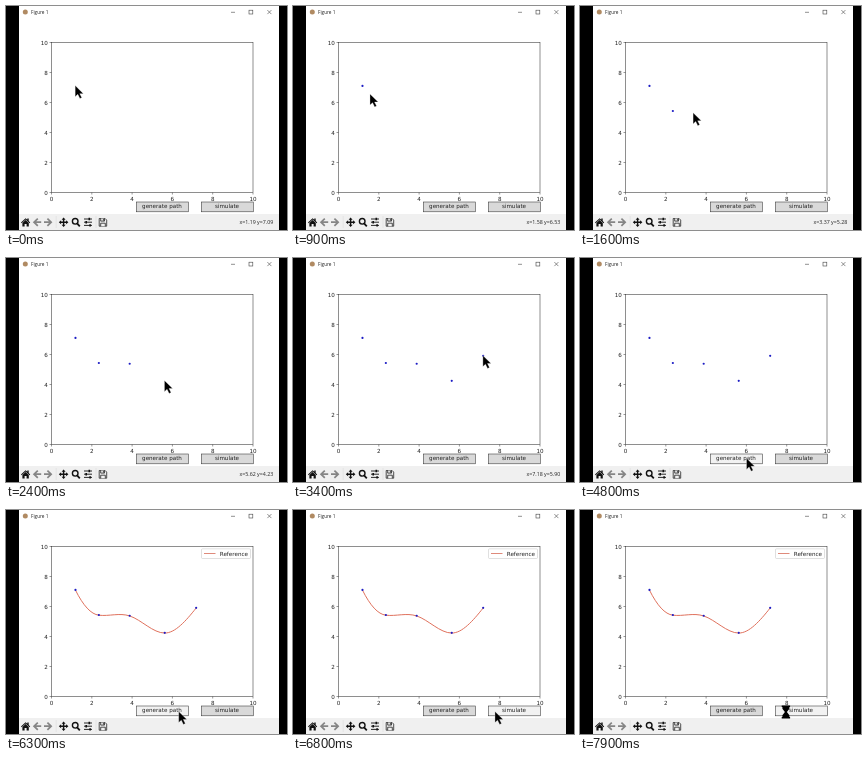
These frames come from a looping animation (281 px wide and 224 px high, 8 s). An HTML page:

```html
<!DOCTYPE html>
<html lang="en">
<head>
<meta charset="utf-8">
<title>Path planner</title>
<style>
html, body { margin: 0; width: 100%; height: 100%; overflow: hidden; background: #000; }
svg { display: block; width: 100vw; height: 100vh; }
.plot { font: 5.6px "DejaVu Sans", sans-serif; fill: #222; }
.ui { font: 5.3px "Open Sans", sans-serif; fill: #222; }
.mid { text-anchor: middle; }
.end { text-anchor: end; }
</style>
</head>
<body>
<svg viewBox="0 0 281 224" xmlns="http://www.w3.org/2000/svg">
  <rect width="281" height="224" fill="#000"/>
  <rect x="13" width="260" height="224" fill="#fff"/>
  <rect x="13" y="208" width="260" height="16" fill="#f0f0f0"/>

  <circle cx="19.3" cy="6" r="2.5" fill="#b08a62"/>
  <text class="ui" x="25" y="7.8" style="font-size:4.7px">Figure 1</text>
  <g fill="none" stroke="#444" stroke-width=".6">
    <path d="M225 6.3h4M261.4 4.1l4 4m0-4l-4 4"/>
    <rect x="243" y="4.2" width="3.8" height="3.8"/>
  </g>

  <g id="ticks" class="plot"></g>
  <rect x="45.5" y="36.5" width="201.5" height="150" fill="none" stroke="#333" stroke-width=".55"/>
  <g id="buttons" class="plot mid"></g>

  <g id="reference">
    <path id="curve" fill="none" stroke="#de6a55" stroke-width=".95"/>
    <rect x="195.5" y="38.8" width="49" height="9.7" rx="1" fill="#fff" stroke="#ccc" stroke-width=".6"/>
    <path d="M198 43.5h11.5" stroke="#dc7d6c" stroke-width=".9"/>
    <text class="plot" x="213.8" y="45.5">Reference</text>
  </g>
  <g id="dots" fill="#1c1cc4"></g>

  <g fill="#111">
    <path d="M15 216.6l4.6-4.4 1.7 1.6v-1.2h1.4v2.5l1.5 1.5-.7.7-3.9-3.7-3.9 3.7z"/>
    <path d="M16.4 217l3.2-3 3.2 3v3.6h-2.2v-2.7h-2v2.7h-2.2z"/>
    <path id="back" d="M26.8 216.2l4.4-4.2 1.2 1.2-2.2 2.1h5v1.8h-5l2.2 2.1-1.2 1.2z" fill="#858585"/>
    <use href="#back" transform="matrix(-1 0 0 1 73.2 0)"/>
    <path d="M57.6 211.4l2 2.3h-1.3v1.8h1.8v-1.3l2.3 2-2.3 2v-1.3h-1.8v1.8h1.3l-2 2.3-2-2.3h1.3v-1.8h-1.8v1.3l-2.3-2 2.3-2v1.3h1.8v-1.8h-1.3z"/>
    <path d="M71.3 217.7l2.5 2.6" stroke="#111" stroke-width="1.8"/>
    <circle cx="69.2" cy="215.3" r="2.8" fill="none" stroke="#111" stroke-width="1.4"/>
    <path d="M78 213h8M78 216.2h8M78 219.4h8" stroke="#111" stroke-width=".9"/>
    <path d="M82.5 211.8h1.6v2.4h-1.6zM79.4 215h1.6v2.4h-1.6zM83.3 218.2h1.6v2.4h-1.6z"/>
  </g>
  <g fill="#f0f0f0" stroke="#222" stroke-width=".8">
    <path d="M93.2 212.5h5.9l1.6 1.6v6.1h-7.5z"/>
    <path d="M94.7 212.5v2.6h3.8v-2.6M94.7 220.2v-3h4.6v3"/>
    <path d="M97.4 212.7v2"/>
  </g>
  <path d="M50.2 210v12M90 210v12" stroke="#ddd" stroke-width=".6"/>
  <text id="status" class="ui end" x="267.3" y="218"></text>

  <g id="cursor">
    <path id="arrow" d="M-.3-.6V10.6L2.3 8.2 4.4 12.4 6.3 11.5 4.3 7.5H7.9Z" fill="#000" stroke="#fff" stroke-width=".3"/>
    <path id="busy" d="M-3.8-6H4.6V-4.5H3.9V-2.8L1.4 .5 3.9 3.8V5.5H4.6V7H-3.8V5.5H-3.1V3.8L-.6 .5-3.1-2.8V-4.5H-3.8Z" fill="#000"/>
  </g>
</svg>
<script>
const LOOP = 8000, STEP = 100;
const $ = id => document.getElementById(id);
const toX = x => 45.5 + 20.15 * x;
const toY = y => 186.5 - 15 * y;

function add(parent, tag, attrs, text = "") {
  const el = document.createElementNS("http://www.w3.org/2000/svg", tag);
  for (const key in attrs) el.setAttribute(key, attrs[key]);
  el.textContent = text;
  parent.append(el);
  return el;
}

// Waypoints: data position, curve slope in pixels, time of the click's effect
const waypoints = [
  { x: 1.19, y: 7.09, slope: 2, at: 700 },
  { x: 2.35, y: 5.42, slope: 0.12, at: 1400 },
  { x: 3.88, y: 5.37, slope: 0.33, at: 2000 },
  { x: 5.62, y: 4.23, slope: 0, at: 2600 },
  { x: 7.18, y: 5.90, slope: -1.25, at: 3400 }
].map(p => ({ ...p, px: toX(p.x), py: toY(p.y) }));

for (const p of waypoints)
  p.dot = add($("dots"), "circle", { cx: p.px, cy: p.py - 0.2, r: 1.1 });

$("curve").setAttribute("d", waypoints.map((p, i) => {
  if (!i) return `M${p.px} ${p.py}`;
  const q = waypoints[i - 1], h = (p.px - q.px) / 3;
  return `C${q.px + h} ${q.py + h * q.slope} ${p.px - h} ${p.py - h * p.slope} ${p.px} ${p.py}`;
}).join(""));

for (let v = 0; v <= 10; v += 2) {
  const x = toX(v), y = toY(v);
  add($("ticks"), "path", { d: `M${x} 186.5v2M45.5 ${y}h-2`, stroke: "#333", "stroke-width": 0.5 });
  add($("ticks"), "text", { x, y: 194.7, class: "mid" }, v);
  add($("ticks"), "text", { x: 41.8, y: y + 2, class: "end" }, v);
}

const buttons = [["generate path", 130], ["simulate", 195]].map(([label, x]) => {
  const rect = add($("buttons"), "rect", { x: x + 0.3, y: 196, width: 52, height: 9.8, stroke: "#333", "stroke-width": 0.55 });
  add($("buttons"), "text", { x: x + 26, y: 202.4 }, label);
  return { x, rect };
});

// Pointer track: time, x, y
const [p1, p2, p3, p4, p5] = waypoints.map(p => [p.px, p.py]);
const track = [
  [0, ...p1], [800, ...p1], [1100, ...p2], [1500, ...p2],
  [1600, 113.4, 107.3], [1800, ...p3], [2000, ...p3], [2400, ...p4],
  [2800, ...p4], [3100, ...p5], [3700, ...p5], [4000, 173, 190],
  [4100, 169.5, 205.5], [4200, 169.5, 204.5], [4400, 168.5, 203], [4500, 168.5, 203],
  [4600, 167.3, 202], [4700, 167.3, 202], [4800, 166.8, 200.8], [6000, 166.8, 200.8],
  [6300, 173, 202], [6700, 199, 202.5], [6900, 205.5, 201.5], [LOOP, 205.5, 201.5]
];

function pointer(t) {
  const i = track.findIndex(k => k[0] > t);
  const [t0, x0, y0] = track[i - 1], [t1, x1, y1] = track[i];
  const f = (t - t0) / (t1 - t0);
  return [x0 + (x1 - x0) * f, y0 + (y1 - y0) * f];
}

const show = (el, on) => el.setAttribute("visibility", on ? "visible" : "hidden");

function render(ms) {
  const t = Math.floor((ms % LOOP) / STEP) * STEP;
  const [x, y] = pointer(t);
  const busy = [600, 5400, 7900].includes(t);

  $("cursor").setAttribute("transform", `translate(${x} ${y})`);
  show($("arrow"), !busy);
  show($("busy"), busy);
  show($("reference"), t >= 5500);
  for (const p of waypoints) show(p.dot, t >= p.at);

  for (const b of buttons) {
    const hover = x > b.x && x < b.x + 52 && y > 196 && y < 205.4;
    b.rect.setAttribute("fill", hover ? "#f2f2f2" : "#d9d9d9");
  }

  const inside = y < 186.5;
  $("status").textContent = inside
    ? `x=${((x - 45.5) / 20.15).toFixed(2)} y=${((186.5 - y) / 15).toFixed(2)}` : "";
}

const start = performance.now();
function tick() {
  render(performance.now() - start);
  requestAnimationFrame(tick);
}
tick();
</script>
</body>
</html>
```
